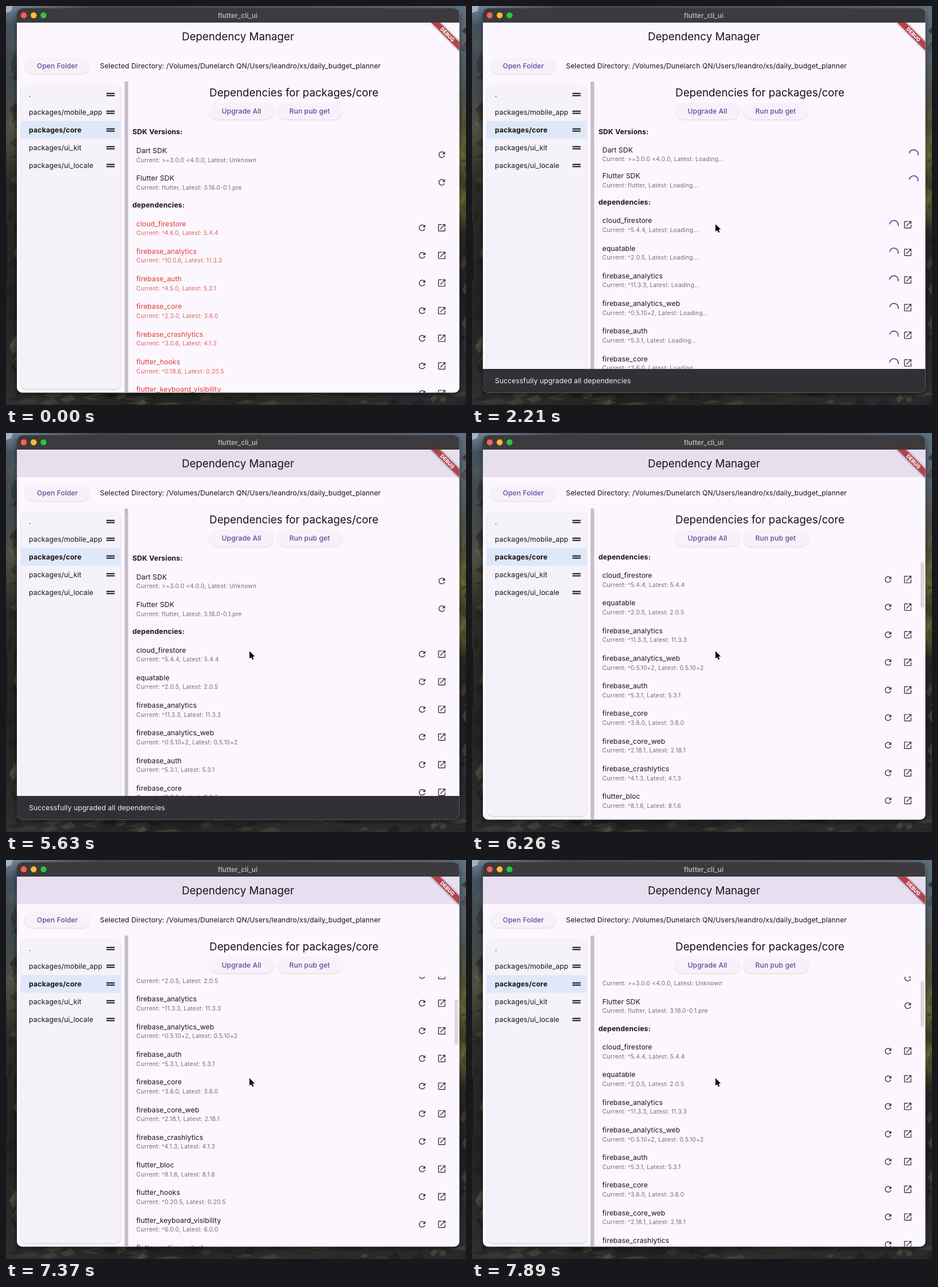
An HTML page that plays this animation: 803 by 697 pixels, repeating every 8000 ms.

```html
<!DOCTYPE html>
<html lang="en">
<head>
<meta charset="utf-8">
<title>Dependency Manager</title>
<style>
  html, body { margin: 0; width: 100%; height: 100%; overflow: hidden; background: #262725; }
  svg { display: block; width: 803px; height: 697px; }
  text { font: 12.2px Inter, sans-serif; letter-spacing: .1px; fill: #161419; white-space: pre; }
  .big { font-size: 18.75px; letter-spacing: 0; text-anchor: middle; }
  .bold { font-weight: 700; letter-spacing: .2px; }
  .btn { font-weight: 500; fill: #5f4b9b; letter-spacing: .05px; text-anchor: middle; }
  .sub { font-size: 10.2px; letter-spacing: .25px; fill: #706d74; }
  .red .name { fill: #dc3d37; }
  .red .sub { fill: #e0605c; }
  .pill { fill: #f7f2fa; filter: drop-shadow(0 1px 1px #0002); }
  .icon { fill: #3d3a42; }
  #app { filter: drop-shadow(0 3px 5px #0008); }
</style>
</head>
<body>
<svg id="stage" viewBox="0 0 803 697" xmlns="http://www.w3.org/2000/svg">
  <defs>
    <linearGradient id="leftHill" x1="0" y1="0" x2="0" y2="1">
      <stop offset="0" stop-color="#70859a"/>
      <stop offset=".05" stop-color="#45525f"/>
      <stop offset=".2" stop-color="#40484b"/>
      <stop offset=".32" stop-color="#504f43"/>
      <stop offset=".45" stop-color="#2a2d27"/>
      <stop offset=".75" stop-color="#222422"/>
      <stop offset="1" stop-color="#2e2f2d"/>
    </linearGradient>
    <linearGradient id="rightHill" x1="0" y1="0" x2="0" y2="1">
      <stop offset="0" stop-color="#5f7082"/>
      <stop offset=".12" stop-color="#56626a"/>
      <stop offset=".3" stop-color="#4b4d38"/>
      <stop offset=".38" stop-color="#6b6b33"/>
      <stop offset=".45" stop-color="#3e4029"/>
      <stop offset=".5" stop-color="#6a6b33"/>
      <stop offset=".58" stop-color="#282924"/>
      <stop offset=".75" stop-color="#1f2020"/>
      <stop offset="1" stop-color="#303031"/>
    </linearGradient>
    <linearGradient id="ground">
      <stop offset="0" stop-color="#303130"/>
      <stop offset=".3" stop-color="#222321"/>
      <stop offset=".6" stop-color="#2d2d2b"/>
      <stop offset="1" stop-color="#2a2a2b"/>
    </linearGradient>
    <linearGradient id="sky">
      <stop offset="0" stop-color="#7d91a2"/>
      <stop offset=".2" stop-color="#434d54"/>
      <stop offset=".5" stop-color="#4d5757"/>
      <stop offset="1" stop-color="#5e6f80"/>
    </linearGradient>
    <clipPath id="frame"><rect x="19" y="4" width="772.5" height="671.5" rx="9"/></clipPath>
    <clipPath id="view"><rect x="213" y="204" width="578" height="472"/></clipPath>
    <path id="refresh" class="icon" transform="scale(.71) translate(-12 -12)" d="M17.65 6.35C16.2 4.9 14.21 4 12 4c-4.42 0-7.99 3.58-7.99 8s3.57 8 7.99 8c3.73 0 6.84-2.55 7.73-6h-2.08c-.82 2.33-3.04 4-5.65 4-3.31 0-6-2.69-6-6s2.69-6 6-6c1.66 0 3.14.69 4.22 1.78L13 11h7V4z"/>
    <path id="open" class="icon" transform="scale(.71) translate(-12 -12)" d="M19 19H5V5h7V3H5c-1.11 0-2 .9-2 2v14c0 1.1.89 2 2 2h14c1.1 0 2-.9 2-2v-7h-2zM14 3v2h3.59l-9.83 9.83 1.41 1.41L19 6.41V10h2V3z"/>
    <path id="grip" fill="#161419" d="M175.3-2.8h14.4v1.9h-14.4zM175.3.9h14.4v1.9h-14.4z"/>
    <circle id="spin" r="7.7" fill="none" stroke="#5b47a0" stroke-width="1.8" pathLength="360"/>
  </defs>

  <rect width="803" height="697" fill="url(#ground)"/>
  <rect width="803" height="8" fill="url(#sky)"/>
  <rect width="24" height="680" fill="url(#leftHill)"/>
  <rect x="786" width="17" height="680" fill="url(#rightHill)"/>
  <g id="rocks"></g>
  <path d="M0 0h12l-3 9-9 3z" fill="#a3b4c0"/>
  <path d="M0 378h2v100H0z" fill="#171818"/>

  <rect id="app" x="19" y="4" width="772.5" height="671.5" rx="9" fill="#fcf7fe"/>
  <g clip-path="url(#frame)">
    <rect id="bar" x="19" y="28" width="773" height="49" fill="#e7dff0"/>
    <text class="big" x="405" y="60">Dependency Manager</text>

    <rect class="pill" x="33" y="90.5" width="113" height="28" rx="14"/>
    <text class="btn" x="89.7" y="108.9">Open Folder</text>
    <text x="164" y="108.9">Selected Directory: /Volumes/Dunelarch QN/Users/leandro/xs/daily_budget_planner</text>

    <rect x="26" y="138.5" width="174" height="530.5" rx="9" fill="#f5f2fa" style="filter:drop-shadow(0 1px 1px #0003)"/>
    <rect x="26" y="201" width="174" height="31" fill="#dfe8f8"/>
    <g id="side"></g>
    <rect x="207" y="132" width="6.3" height="544" fill="#c4bfca"/>

    <text class="big" x="502.7" y="158">Dependencies for packages/core</text>
    <rect id="upgrade" class="pill" x="355" y="170" width="112" height="28" rx="14"/>
    <text class="btn" x="411" y="188.3">Upgrade All</text>
    <rect class="pill" x="474" y="170" width="113" height="28" rx="14"/>
    <text class="btn" x="530" y="188.3">Run pub get</text>

    <g clip-path="url(#view)"><g id="list"></g></g>
    <rect id="thumb" x="783" width="6.5" height="78.5" fill="#dcd8e0"/>

    <g transform="translate(791.5 28.8) rotate(45)">
      <rect x="-36" y="24.4" width="72" height="10.4" fill="#b5424a" style="filter:drop-shadow(0 0 2px #0007)"/>
      <text y="32.8" text-anchor="middle" style="font-size:8.9px;font-weight:800;fill:#fff;letter-spacing:0">DEBUG</text>
    </g>

    <g id="snack">
      <rect x="19" y="634" width="773" height="42" fill="#322f35"/>
      <text x="40" y="659.2" style="fill:#f5eff7">Successfully upgraded all dependencies</text>
    </g>

    <rect x="19" y="4" width="773" height="25" fill="#3b3a3c"/>
    <circle cx="31" cy="16.3" r="5.2" fill="#ff5f57"/>
    <circle cx="48.3" cy="16.3" r="5.2" fill="#febc2e"/>
    <circle cx="65.5" cy="16.3" r="5.2" fill="#28c840"/>
    <text x="404.5" y="20.6" text-anchor="middle" style="font-size:11.6px;font-weight:600;fill:#b7b5b8">flutter_cli_ui</text>
  </g>
  <path id="cursor" d="M0 0v13.2l3-2.8 2 4.7 2.3-1-2-4.5h4.1z" fill="#000" stroke="#fff" stroke-width="1.6" stroke-linejoin="round" paint-order="stroke"/>
</svg>

<script>
const LOOP = 8000, RELOAD = 1360, PITCH = 48.27;
const $ = id => document.getElementById(id);
const clamp = v => Math.min(1, Math.max(0, v));
const smooth = p => p * p * (3 - 2 * p);
const show = (el, on) => el.setAttribute('display', on ? 'inline' : 'none');
const move = (el, x, y) => el.setAttribute('transform', `translate(${x} ${y})`);

function add(parent, tag, attrs = {}, text = '') {
  const el = document.createElementNS('http://www.w3.org/2000/svg', tag);
  for (const k in attrs) el.setAttribute(k, attrs[k]);
  el.textContent = text;
  parent.append(el);
  return el;
}
const use = (parent, id, x, y) => add(parent, 'use', { href: '#' + id, x, y });

// Rough slopes of the wallpaper around the window.
let seed = 11;
const rnd = () => (seed = seed * 16807 % 2147483647) / 2147483647;
for (let i = 0; i < 110; i++) {
  const below = i < 50, y = below ? 676 + rnd() * 20 : 20 + rnd() * 650;
  const x = below ? rnd() * 800 : rnd() < .5 ? rnd() * 14 : 792 + rnd() * 10;
  const w = 5 + rnd() * (below ? 34 : 10), h = 3 + rnd() * (below ? 7 : 22);
  add($('rocks'), 'path', {
    d: `M${x} ${y}l${w} ${-h}l${w * .4} ${h}l${-w * .8} ${h * .6}z`,
    fill: rnd() < .6 ? '#131412' : '#6d6c55', opacity: .15 + rnd() * .25
  });
}

['.', 'packages/mobile_app', 'packages/core', 'packages/ui_kit', 'packages/ui_locale'].forEach((name, i) => {
  const y = 154.6 + i * 31;
  add($('side'), 'text', { x: 40, y: y + 4.3, class: i == 2 ? 'bold' : '' }, name);
  use($('side'), 'grip', 0, y);
});

// One list entry; y = 0 is the middle of its title.
function makeRow(parent, name, current, latest, isPackage, readyAt) {
  const g = add(parent, 'g');
  const sub = s => add(g, 'text', { x: 227.5, y: 20, class: 'sub' }, `Current: ${current}, Latest: ${s}`);
  add(g, 'text', { x: 227.5, y: 4.4, class: 'name' }, name);
  if (isPackage) use(g, 'open', 760.7, 7.2);
  return {
    g, readyAt,
    done: [sub(latest), use(g, 'refresh', isPackage ? 726.4 : 760.7, 7.2)],
    busy: [sub('Loading...'), use(g, 'spin', isPackage ? 736.6 : 771, 7.5)]
  };
}

const list = $('list');
const heading = s => add(list, 'text', { x: 220.7, y: 4.4, class: 'bold' }, s);
const sdkHead = heading('SDK Versions:');
const depHead = heading('dependencies:');
const sdks = [
  makeRow(list, 'Dart SDK', '>=3.0.0 <4.0.0', 'Unknown', false, 3100),
  makeRow(list, 'Flutter SDK', 'flutter', '3.16.0-0.1.pre', false, 3260)
];
const oldList = add(list, 'g', { class: 'red' });
const newList = add(list, 'g');
const oldRows = [
  ['cloud_firestore', '4.6.0', '5.4.4'], ['firebase_analytics', '10.0.6', '11.3.3'],
  ['firebase_auth', '4.5.0', '5.3.1'], ['firebase_core', '2.3.0', '3.6.0'],
  ['firebase_crashlytics', '3.0.6', '4.1.3'], ['flutter_hooks', '0.18.6', '0.20.5'],
  ['flutter_keyboard_visibility', '5.4.0', '6.0.0']
].map(([name, from, to]) => makeRow(oldList, name, '^' + from, to, true, 0));
const newRows = [
  ['cloud_firestore', '5.4.4'], ['equatable', '2.0.5'], ['firebase_analytics', '11.3.3'],
  ['firebase_analytics_web', '0.5.10+2'], ['firebase_auth', '5.3.1'], ['firebase_core', '3.6.0'],
  ['firebase_core_web', '2.18.1'], ['firebase_crashlytics', '4.1.3'], ['flutter_bloc', '8.1.6'],
  ['flutter_hooks', '0.20.5'], ['flutter_keyboard_visibility', '6.0.0'], ['flutter_native_splash', '2.4.1']
].map(([name, v], i) => makeRow(newList, name, '^' + v, v, true, 3300 + i * 5 % 7 * 90));

function setRow(row, t, y) {
  const busy = t >= RELOAD && t < row.readyAt;
  row.done.forEach(el => show(el, !busy));
  row.busy.forEach(el => show(el, busy));
  move(row.g, 0, y - (busy && sdks.includes(row) ? 1.3 : 0));
  return busy;
}

// Progress through a gesture seen in n discrete steps.
function stepped(t, start, end, n) {
  if (t < start) return 0;
  const k = Math.min(n - 1, Math.floor((t - start) / (end - start) * (n - 1) + 1e-6));
  return smooth((k + .4) / (n - .6));
}

const scrollAt = t =>
  130.8 * stepped(t, 5630, 6050, 8) +
  103.7 * stepped(t, 6260, 6680, 9) -
  181 * stepped(t, 7370, 7890, 11);

// cubic-bezier(.4, 0, .2, 1)
function fastOutSlowIn(x) {
  let lo = 0, hi = 1;
  for (let i = 0; i < 18; i++) {
    const m = (lo + hi) / 2, n = 1 - m;
    if (1.2 * n * n * m + .6 * n * m * m + m * m * m < x) lo = m; else hi = m;
  }
  return smooth(lo);
}

function drawSpinner(t) {
  const p = t % 1333 / 1333;
  const head = fastOutSlowIn(clamp(p * 2)), tail = fastOutSlowIn(clamp(p * 2 - 1));
  const angle = -90 + tail * 270 + t / 2222 * 360 + p * 90;
  $('spin').setAttribute('transform', `rotate(${angle})`);
  $('spin').setAttribute('stroke-dasharray', `${Math.max(.1, (head - tail) * 270)} 360`);
}

function drawCursor(t) {
  const up = stepped(t, 320, 1110, 16), down = stepped(t, 1500, 1950, 9), q = 1 - up;
  const x = q * q * 476 + 2 * q * up * 494 + up * up * 414;
  const y = q * q * 333 + 2 * q * up * 235 + up * up * 184;
  show($('cursor'), t >= 320);
  move($('cursor'), x + (425 - x) * down, y + (381 - y) * down);
  $('upgrade').style.fill = up > .85 && down < .1 ? '#efe9f6' : '';
}

function draw(t) {
  const scroll = scrollAt(t);
  move(list, 0, -scroll);
  show($('bar'), scroll > 0);
  $('thumb').setAttribute('y', 203 + scroll * .1756);
  $('thumb').setAttribute('opacity', clamp((t - 5650) / 150));

  let shift = 0;
  sdks.forEach((row, i) => { if (setRow(row, t, 252.5 + i * PITCH - shift)) shift += 2.65; });
  move(sdkHead, 0, 220);
  move(depHead, 0, 348 - shift);
  show(oldList, t < RELOAD);
  show(newList, t >= RELOAD);
  const rows = t < RELOAD ? oldRows : newRows;
  rows.forEach((row, i) => setRow(row, t, 380.2 + i * PITCH - shift));

  const rise = fastOutSlowIn(clamp((t - 1400) / 250)) * (1 - fastOutSlowIn(clamp((t - 5690) / 250)));
  move($('snack'), 0, 42 * (1 - rise));
  drawSpinner(Math.max(0, t - RELOAD));
  drawCursor(t);
}

const begin = performance.now();
function tick() {
  draw((performance.now() - begin) % LOOP);
  requestAnimationFrame(tick);
}
tick();
</script>
</body>
</html>
```
